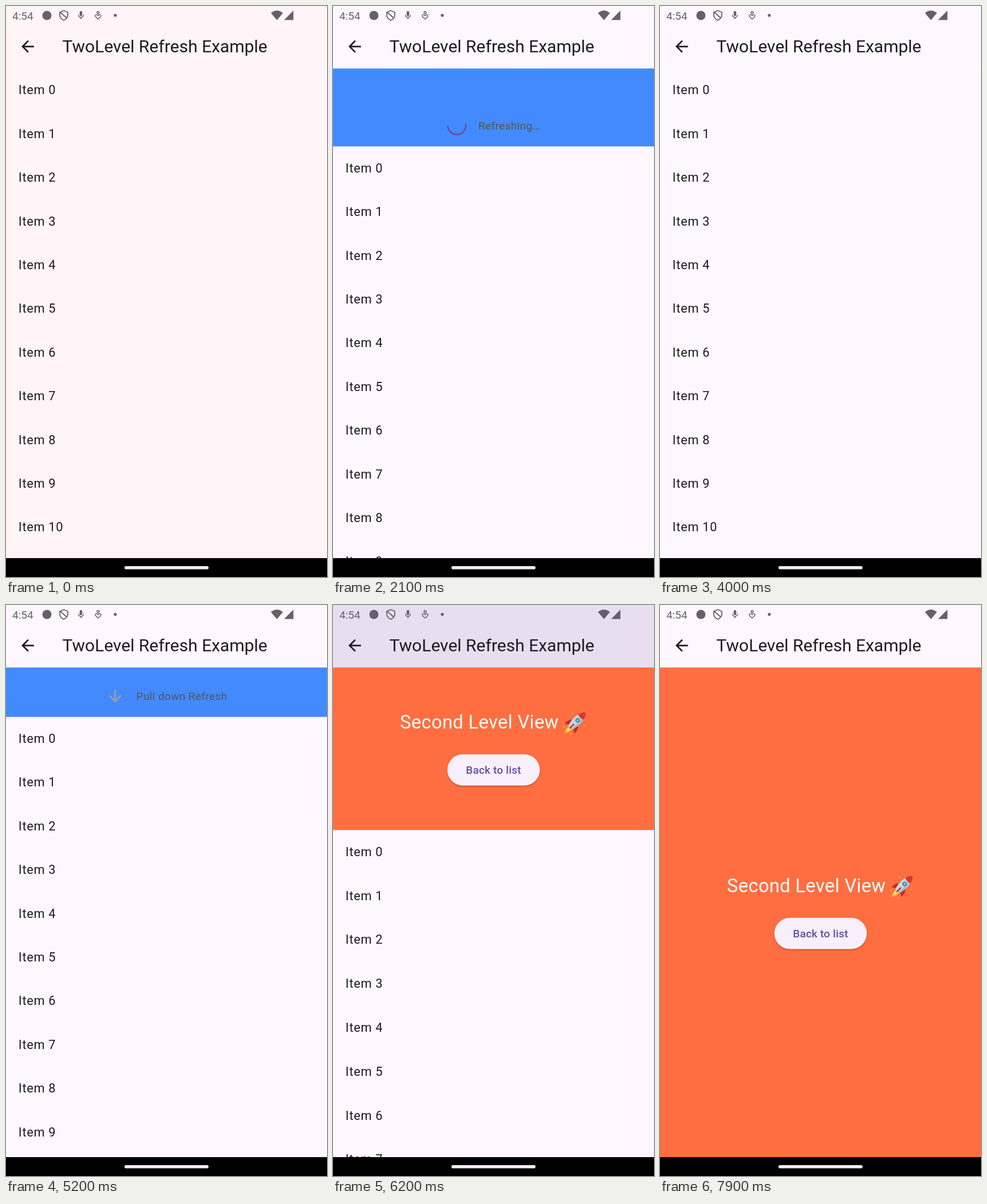
These frames come from a looping animation (561 by 998 pixels, 8000 ms). An HTML page:

```html
<!DOCTYPE html>
<html lang="en">
<head>
<meta charset="utf-8">
<title>TwoLevel Refresh Example</title>
<style>
  html, body { margin: 0; width: 100%; height: 100%; overflow: hidden; background: #fef7ff; }
  svg { display: block; width: 100%; height: 100%; }
  text { font-family: Roboto, sans-serif; white-space: pre; }
  .item { font-size: 21.82px; letter-spacing: .68px; fill: #1d1b20; }
  .label { font-size: 19.1px; letter-spacing: .34px; fill: #555; }
</style>
</head>
<body>
<svg viewBox="0 0 561 998" preserveAspectRatio="none">
  <defs>
    <g id="rocket" transform="rotate(45)">
      <path d="M-4 13Q-6 20 0 27Q6 20 4 13Z" fill="#fdb52a"/>
      <path d="M-2 13Q-3 18 0 22Q3 18 2 13Z" fill="#fff3a0"/>
      <path d="M-6 0Q-13 4 -12 15L-5 11ZM6 0Q13 4 12 15L5 11Z" fill="#c62828"/>
      <path d="M0 -25C9 -16 9 0 5 13H-5C-9 0 -9 -16 0 -25Z" fill="#a9bfc9"/>
      <path d="M0 -25C4 -16 4 0 2 13H-5C-9 0 -9 -16 0 -25Z" fill="#c9d8de"/>
      <path d="M0 -25C4 -21 6 -17 6.500 -13Q0 -10 -6.500 -13C-6 -17 -4 -21 0 -25Z" fill="#d9382f"/>
      <circle cy="-5" r="3.800" fill="#2f7896"/>
      <circle cy="-5" r="2.300" fill="#70cbe8"/>
      <path d="M-1.200 4H1.200V15H-1.200Z" fill="#b52a2a"/>
      <g fill="#fdd14a">
        <circle cx="-15" cy="-7" r="1"/><circle cx="15" cy="-7" r="1"/>
        <circle cx="-9" cy="20" r="1.200"/><circle cx="9" cy="20" r="1.200"/>
      </g>
    </g>
    <filter id="shadow" x="-10%" y="-20%" width="120%" height="150%">
      <feDropShadow dx="0" dy="1.500" stdDeviation="1.300" flood-color="#000" flood-opacity=".32"/>
    </filter>
  </defs>

  <rect id="page" width="561" height="998"/>
  <rect id="panel" y="109" width="561"/>

  <g id="pull">
    <path id="icon" fill="#9e9e9e"/>
    <circle id="spinner" r="15.700" fill="none" stroke="#6750a4" stroke-width="2.730" pathLength="1"/>
    <text id="label" class="label"></text>
    <use id="labelRocket" href="#rocket"/>
  </g>

  <g id="second">
    <text x="117" y="-35.300" font-size="32.730" letter-spacing=".34" fill="#fff">Second Level View</text>
    <use href="#rocket" transform="translate(424 -46)"/>
    <rect x="199.800" y="9.800" width="161.600" height="54.500" rx="27.250" fill="#f7f0fa" filter="url(#shadow)"/>
    <text x="280.500" y="44" font-size="19.100" font-weight="500" letter-spacing=".14"
          text-anchor="middle" fill="#6250a0">Back to list</text>
  </g>

  <g id="list"></g>

  <rect id="bar" width="561" height="109.200"/>
  <path transform="translate(21.600 54.400) scale(1.364)" fill="#1d1b20"
        d="M20 11H7.830l5.590-5.590L12 4l-8 8 8 8 1.410-1.410L7.830 13H20z"/>
  <text x="98.500" y="80.600" font-size="30" fill="#1d1b20">TwoLevel Refresh Example</text>

  <g fill="#656168">
    <text x="11" y="23.800" font-size="19.100">4:54</text>
    <circle cx="71.500" cy="16.500" r="8"/>
    <path d="M101 8l7 3v5c0 4-3 7-7 9c-4-2-7-5-7-9v-5zM95 11l11 10" fill="none" stroke="#656168" stroke-width="1.800"/>
    <path transform="translate(122 7.200) scale(.75)"
          d="M12 14c1.660 0 3-1.340 3-3V5c0-1.660-1.340-3-3-3S9 3.340 9 5v6c0 1.660 1.340 3 3 3zm5-3c0 2.760-2.240 5-5 5s-5-2.240-5-5H5c0 3.530 2.610 6.430 6 6.920V21h2v-3.080c3.390-.49 6-3.390 6-6.920z"/>
    <g fill="none" stroke="#656168" stroke-width="1.500">
      <circle cx="161" cy="11.300" r="1.900"/>
      <path d="M161 23L156.500 18.600C154.500 15.500 159 13.500 161 17C163 13.500 167.500 15.500 165.500 18.600Z"/>
    </g>
    <circle cx="191" cy="16.300" r="2.600"/>
    <path d="M473.500 24.800L463 12.300Q473.500 3.500 484 12.300ZM486 24.600H502.300V8Z"/>
  </g>

  <rect y="965" width="561" height="33"/>
  <rect x="207" y="979" width="147" height="5.600" rx="2.800" fill="#f1eff2"/>
</svg>

<script>
const LOOP = 8000, TOP = 109, FULL = 856, MID = 280.5, DP = 1.364;
const REST = 100 * DP, REFRESH_AT = 80 * DP, SECRET_AT = 150 * DP;
const OPEN = 6165, OPENED = OPEN + 500;
const $ = id => document.getElementById(id);
const clamp = x => Math.min(1, Math.max(0, x));
const span = (t, a, b) => clamp((t - a) / (b - a));
const mix = (a, b, u) => a + (b - a) * u;
const easeOut = (u, p) => 1 - (1 - u) ** p;
const smooth = u => u * u * (3 - 2 * u);

const ICONS = {
  down: 'M20 12l-1.41-1.41L13 16.17V4h-2v12.17l-5.58-5.59L4 12l8 8 8-8z',
  again: 'M17.65 6.35C16.2 4.9 14.21 4 12 4c-4.42 0-7.99 3.58-7.99 8s3.57 8 7.99 8c3.73 0 6.84-2.55 7.73-6h-2.08c-.82 2.33-3.04 4-5.65 4-3.31 0-6-2.69-6-6s2.69-6 6-6c1.66 0 3.14.69 4.22 1.78L13 11h7V4z',
  done: 'M9 16.2L4.8 12l-1.4 1.4L9 19 21 7l-1.4-1.4z'
};
const STATES = {
  idle: ['Pull down Refresh', 'down'],
  ready: ['Release to refresh', 'again'],
  busy: ['Refreshing…', 'spin'],
  done: ['Refresh completed', 'done'],
  secret: ['Pull even harder for a secret level', 'rocket']
};

const items = Array.from({ length: 12 }, (_, i) => {
  const el = document.createElementNS('http://www.w3.org/2000/svg', 'text');
  el.setAttribute('class', 'item');
  el.setAttribute('x', 21.8);
  el.textContent = 'Item ' + i;
  $('list').append(el);
  return el;
});

function set(id, attrs) {
  for (const k in attrs) $(id).setAttribute(k, attrs[k]);
}
function show(id, on) {
  $(id).style.display = on ? '' : 'none';
}

// Height of the area pulled open above the list
function pulled(t) {
  if (t < 1670) return 124 * easeOut(span(t, 750, 1650), 1.4);
  if (t < 3230) return mix(124, REST, smooth(span(t, 1670, 1870)));
  if (t < 4000) {
    const x = (t - 3230) * .012;
    return REST * (1 + x) * Math.exp(-x);
  }
  if (t < OPEN) return 240 * easeOut(span(t, 5050, 5900), 2.29);
  return mix(240, FULL, span(t, OPEN, OPENED));
}

function stateAt(t, h) {
  if (t >= 1670 && t < 2650) return 'busy';
  if (t >= 2650 && t < 4000) return 'done';
  return h > SECRET_AT ? 'secret' : h > REFRESH_AT ? 'ready' : 'idle';
}

function drawSpinner(t, x, y) {
  const u = (t - 1670) / 1333, f = u % 1;
  const head = smooth(clamp(f * 2)), tail = smooth(clamp(f * 2 - 1));
  const sweep = Math.max(.02, .75 * (head - tail));
  const turn = -90 + tail * 270 + u * 240;
  set('spinner', {
    'stroke-dasharray': `${sweep} 1`,
    transform: `translate(${x} ${y}) rotate(${turn})`
  });
}

function drawPull(t, h) {
  const [words, kind] = STATES[stateAt(t, h)];
  const label = $('label'), edge = TOP + h;
  const rocket = kind === 'rocket', spin = kind === 'spin';
  if (label.textContent !== words) label.textContent = words;
  const textW = label.getComputedTextLength();
  const iconW = (spin ? 25 : 24) * DP, gap = 15 * DP;
  const left = MID - (textW + (rocket ? 28.5 : iconW + gap)) / 2;
  const y = edge - 36.4;
  set('label', {
    x: rocket ? left : left + iconW + gap,
    y: edge - (rocket ? 26.8 : 29.6)
  });
  show('icon', !rocket && !spin);
  show('spinner', spin);
  show('labelRocket', rocket);
  if (spin) drawSpinner(t, left + iconW / 2, y);
  else if (rocket) set('labelRocket', { transform: `translate(${left + textW + 17} ${edge - 33.7}) scale(.6)` });
  else set('icon', { d: ICONS[kind], transform: `translate(${left} ${y - iconW / 2}) scale(${DP})` });
}

function draw(t) {
  const h = pulled(t), open = t >= OPEN, moving = open && t < OPENED;
  const u = span(t, 0, 500);
  const page = `rgb(${mix(255, 254, u)},${mix(244, 247, u)},${mix(248, 255, u)})`;
  set('page', { fill: page });
  set('bar', { fill: moving ? '#e7dff0' : page });
  set('panel', { height: h, fill: open ? '#ff6e40' : '#448aff' });

  show('pull', !open && h > 0);
  show('second', open);
  if (open) set('second', { transform: `translate(0 ${TOP + h / 2})` });
  else if (h > 0) drawPull(t, h);

  const pitch = moving ? 76.8 : 76.4;
  items.forEach((el, i) => el.setAttribute('y', TOP + h + 45.4 + i * pitch));
}

function tick(now) {
  draw(now % LOOP);
  requestAnimationFrame(tick);
}
draw(0);
requestAnimationFrame(tick);
</script>
</body>
</html>
```
